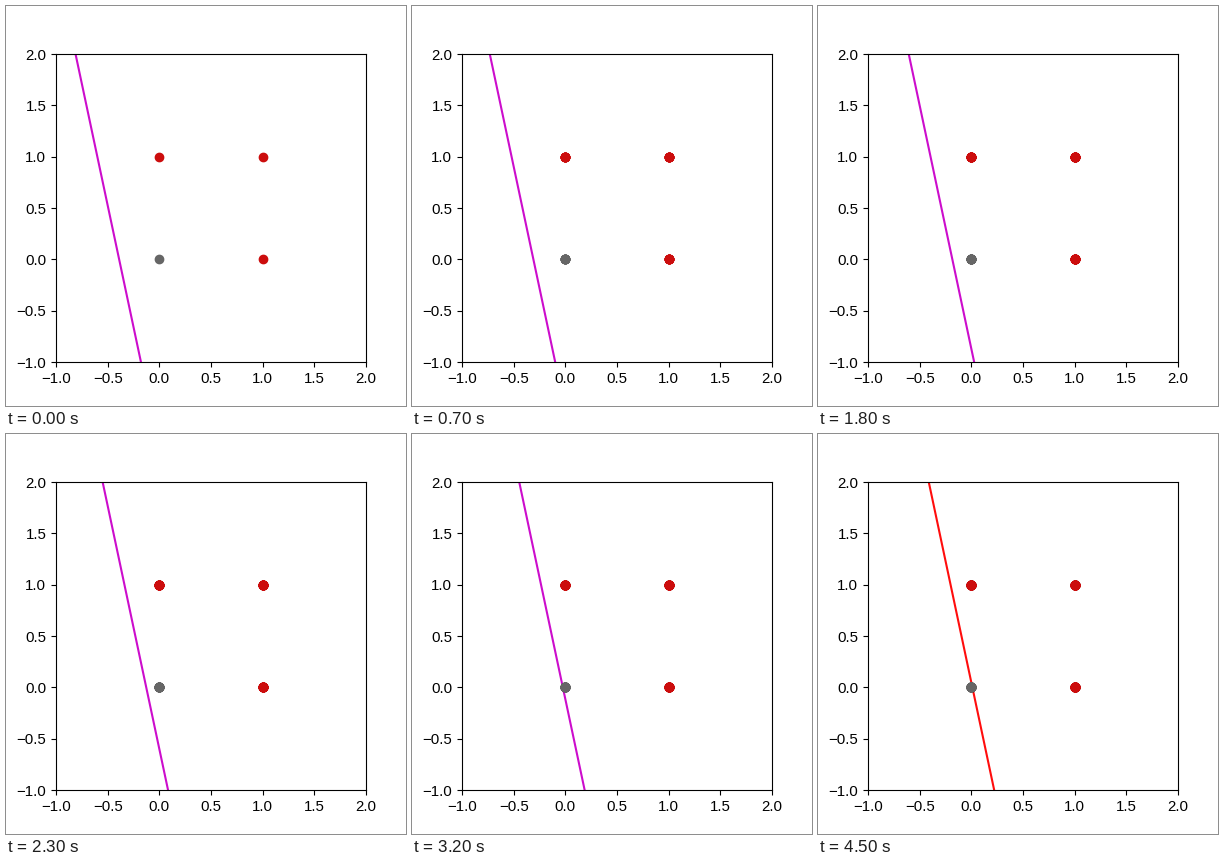
Animation, 400 px wide and 400 px high, one loop 4.6 s. Source, as a matplotlib script:

```python
import numpy as np
import matplotlib.pyplot as plt
from matplotlib.animation import FuncAnimation

plt.rcParams["font.family"] = "Liberation Sans"
plt.rcParams["font.size"] = 10.8

FRAMES, INTERVAL = 46, 100
LAST_STEP = 35          # the boundary stops here, then turns red
STEP = 0.0114           # shift of the boundary per frame
END_X = 0.010           # where the settled boundary crosses y = 0
LEAN = -0.211           # dx / dy of the boundary

fig, ax = plt.subplots(figsize=(4, 4), dpi=100)
ax.set(xlim=(-1, 2), ylim=(-1, 2))
ticks = np.arange(-1, 2.1, 0.5)
ax.set_xticks(ticks)
ax.set_yticks(ticks)

heights = np.array([-1.0, 2.0])
boundary, = ax.plot([], [], lw=1.5)
zeros, = ax.plot([], [], "o", color="#666666")
ones, = ax.plot([], [], "o", color="#cc0d0d")


def stack(dots, points, layers):
    """Paint the same dots repeatedly so that their edges harden."""
    dots.set_data(*np.tile(np.array(points).T, layers))


def update(i):
    x = END_X - STEP * (LAST_STEP - min(i, LAST_STEP))
    boundary.set_data(x + LEAN * heights, heights)
    boundary.set_color("#cc0dcc" if i <= LAST_STEP else "#ff0d0d")
    stack(zeros, [(0, 0)], i + 1)
    stack(ones, [(0, 1), (1, 0), (1, 1)], i + 1)
    return boundary, zeros, ones


anim = FuncAnimation(fig, update, frames=FRAMES, interval=INTERVAL,
                     repeat=True, repeat_delay=0)
plt.show()
```
